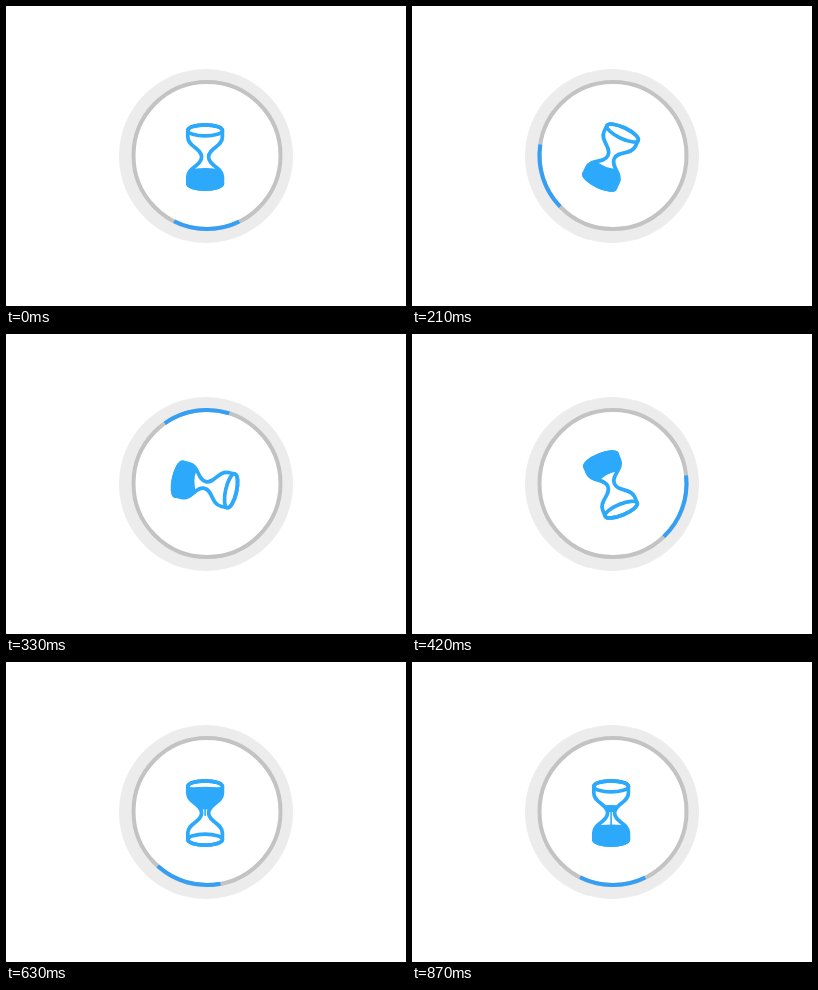
These frames come from a looping animation (400x300 px, 0.9 s). An HTML page with a canvas:

```html
<!DOCTYPE html>
<html lang="en">
<head>
<meta charset="utf-8">
<title>Hourglass loader</title>
<style>
  html, body { margin: 0; width: 100%; height: 100%; overflow: hidden; background: #fff; }
  canvas { display: block; width: 400px; height: 300px; }
</style>
</head>
<body>
<canvas id="stage"></canvas>
<script>
const LOOP = 900, STEP = 30, FLIP = 540, POUR = 330;
const BLUE = '#2ca9fb', ARC = '#349ff5', GREY = '#c3c3c3', PALE = '#ececec';
const RAD = Math.PI / 180;
const CX = 199.1, CY = 151;      // hourglass pivot
const RX = 17.3, RY = 5.5;       // rim ellipse
const RIM = 26.6;                // rim distance from the pivot

const canvas = document.getElementById('stage');
const ctx = canvas.getContext('2d');
const dpr = window.devicePixelRatio || 1;
canvas.width = 400 * dpr;
canvas.height = 300 * dpr;

const clamp = u => Math.min(1, Math.max(0, u));

// Smooth curve through [time, value] keys, level at every turning point.
function curve(...keys) {
  const n = keys.length - 1;
  const rate = i => (keys[i + 1][1] - keys[i][1]) / (keys[i + 1][0] - keys[i][0]);
  const slope = keys.map((_, i) => {
    if (i === 0 || i === n) return 0;
    const a = rate(i - 1), b = rate(i);
    return a * b > 0 ? 2 * a * b / (a + b) : 0;
  });
  return t => {
    if (t >= keys[n][0]) return keys[n][1];
    let i = 0;
    while (t > keys[i + 1][0]) i++;
    const [t0, v0] = keys[i], [t1, v1] = keys[i + 1];
    const h = t1 - t0, u = (t - t0) / h, w = 1 - u;
    return w * w * (1 + 2 * u) * v0 + u * u * (3 - 2 * u) * v1
      + h * u * w * (w * slope[i] - u * slope[i + 1]);
  };
}

// Both wind up, swing past the goal and settle.
const turn = curve([0, 0], [95, -9], [525, 187], [600, 180]);
const spin = curve([0, 0], [100, -40], [210, 72], [330, 171], [535, 396], [745, 348], [870, 360]);

// Half of the outline, from rim to neck; the rest is mirrored.
function glassPath() {
  const path = new Path2D();
  const neck = 3.5;
  path.ellipse(0, -RIM, RX, RY, 0, Math.PI, 2 * Math.PI);
  path.lineTo(RX, -20);
  path.bezierCurveTo(RX, -10, neck, -9, neck, 0);
  path.bezierCurveTo(neck, 9, RX, 10, RX, 20);
  path.ellipse(0, RIM, RX, RY, 0, 0, Math.PI);
  path.lineTo(-RX, 20);
  path.bezierCurveTo(-RX, 10, -neck, 9, -neck, 0);
  path.bezierCurveTo(-neck, -9, -RX, -10, -RX, -20);
  path.closePath();
  return path;
}
const glass = glassPath();

function disc(x, y, r, color) {
  ctx.beginPath();
  ctx.arc(x, y, r, 0, 2 * Math.PI);
  ctx.fillStyle = color;
  ctx.fill();
}

function ring(color, from, to) {
  ctx.beginPath();
  ctx.arc(201, 149.5, 73.5, from * RAD, to * RAD);
  ctx.lineWidth = 4;
  ctx.strokeStyle = color;
  ctx.stroke();
}

// Fills from a surface that bulges by `dome` down to `bottom`.
function sand(level, bottom, dome = 0.4, slant = 0) {
  const edge = level + dome, dy = 12 * Math.tan(slant * RAD);
  ctx.beginPath();
  ctx.moveTo(-22, edge - dy);
  ctx.lineTo(-12, edge - dy);
  ctx.quadraticCurveTo(0, level - dome, 12, edge + dy);
  ctx.lineTo(22, edge + dy);
  ctx.lineTo(22, bottom);
  ctx.lineTo(-22, bottom);
  ctx.fill();
}

function pour(t) {
  const run = clamp((t - FLIP) / POUR);
  const front = -1 - 9 * (1 - run) ** 4;
  sand(-33 + 25 * run, front);
  sand(36 - 24.5 * run * run, 40);
  ctx.fillRect(-0.8, front - 1, 1.6, Math.max(0, 60 * (run - 0.15)));
}

function hourglass(t) {
  const flipped = t >= FLIP, angle = turn(t);
  ctx.save();
  ctx.translate(CX, CY);
  ctx.rotate((flipped ? angle - 180 : angle) * RAD);
  ctx.fillStyle = ctx.strokeStyle = BLUE;
  ctx.lineWidth = 3.7;

  ctx.save();
  ctx.clip(glass);
  if (flipped) pour(t);
  else sand(11, 40, 1 - 3.5 * clamp(t / 120), -15 * Math.sin(angle * RAD));
  ctx.restore();

  ctx.stroke(glass);
  for (const y of [-RIM, RIM]) {
    ctx.beginPath();
    ctx.ellipse(0, y, RX, RY, 0, 0, 2 * Math.PI);
    ctx.stroke();
  }
  ctx.restore();
}

function draw(t) {
  ctx.setTransform(dpr, 0, 0, dpr, 0, 0);
  ctx.fillStyle = '#fff';
  ctx.fillRect(0, 0, 400, 300);
  disc(200, 150, 87, PALE);
  disc(201, 149.5, 73.5, '#fff');
  ring(GREY, 0, 360);
  const mid = 90.3 + spin(t);
  ring(ARC, mid - 26.3, mid + 26.3);
  hourglass(t);
}

const start = performance.now();
function tick() {
  const t = (performance.now() - start) % LOOP;
  draw(Math.floor(t / STEP) * STEP);
  requestAnimationFrame(tick);
}
tick();
</script>
</body>
</html>
```
